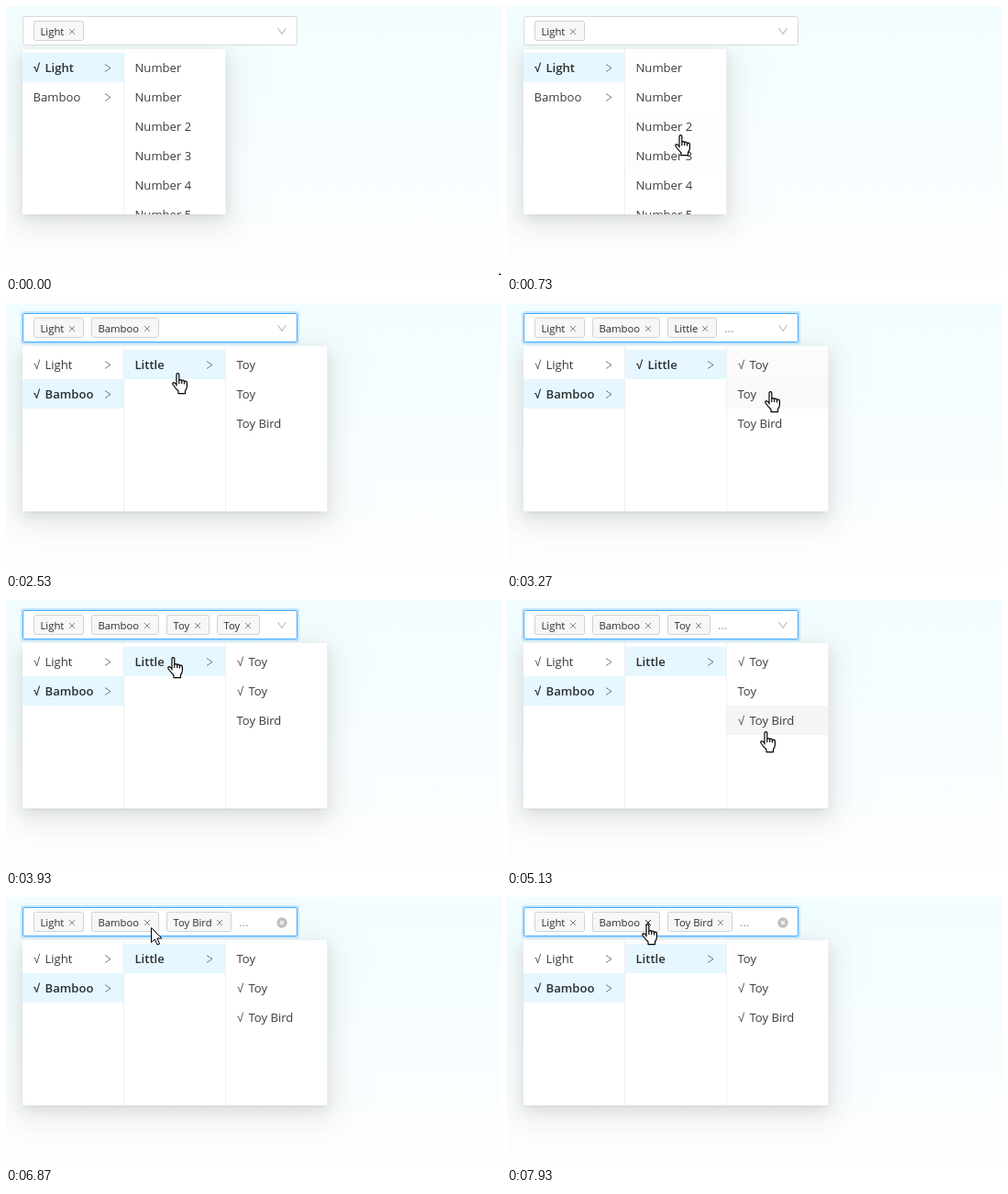
Recreate the animation shown at these times as an HTML page with a canvas. Size 540 by 293 pixels, loop 8000 ms.

```html
<!DOCTYPE html>
<html lang="en">
<head>
<meta charset="utf-8">
<title>Cascading multi-select</title>
<style>
  html, body { margin: 0; width: 100%; height: 100%; overflow: hidden; background: #fff; }
  canvas { display: block; width: 540px; height: 293px; }
</style>
</head>
<body>
<canvas id="stage" width="540" height="293"></canvas>
<script>
const ctx = document.getElementById('stage').getContext('2d');
const LOOP = 8000, FPS = 15;
const FONT = '"Open Sans", "Noto Sans", sans-serif';
const TOP = 47, ROW_TOP = 51, ROW = 32, COL = 111, LEFT = 18, BOTTOM = 227;

// Pointer hotspot: [tick, x, y]
const PATH = [
  [0, 538, 291], [13, 125, 113], [20, 125, 113], [21, 83, 113], [28, 83, 113],
  [29, 67, 98], [30, 67, 98], [35, 188, 75], [37, 188, 75], [38, 187, 76],
  [41, 187, 76], [42, 240, 74], [43, 287, 77], [46, 287, 77], [50, 287, 102],
  [52, 287, 102], [55, 178, 64], [56, 182, 62], [59, 182, 62], [63, 277, 112],
  [69, 277, 112], [72, 282, 143], [77, 282, 143], [82, 298, 98], [86, 296, 97],
  [87, 296, 97], [88, 250, 48], [89, 222, 41], [91, 214, 42], [94, 209, 29],
  [97, 209, 29], [100, 179, 36], [101, 177, 35], [103, 158, 33], [105, 172, 32],
  [113, 172, 32], [119, 153, 29]
];

// Picked options in order: id, tag label, tick picked, tick dropped
const PICKS = [
  ['light', 'Light', 0, 999], ['bamboo', 'Bamboo', 30, 999],
  ['little', 'Little', 41, 59], ['toy1', 'Toy', 46, 97], ['toy2', 'Toy', 51, 69],
  ['bird', 'Toy Bird', 77, 999], ['toy2', 'Toy', 84, 999]
];
const TAG_WIDTH = { Light: 55, Bamboo: 74, Little: 54, Toy: 47, 'Toy Bird': 71 };
const NUMBERS = ['Number', 'Number', 'Number 2', 'Number 3', 'Number 4', 'Number 5']
  .map((label, i) => ({ id: 'n' + i, label }));

const HAND = new Path2D('M5 14V2Q5 .6 6.4 .6Q7.8 .6 7.8 2V8Q9.4 6.9 10.7 8.5Q12.3 7.6 13.5 9.3' +
  'Q16.3 8.6 16.4 11V15Q16.2 17.5 14.5 19.6V22.6H7V20Q4 17 1.1 13Q.2 11 1.8 10.7Q3.4 10.8 5 13Z');
const HAND_LINES = new Path2D('M7.8 8V12M10.7 8.5V12M13.5 9.3V12.5');
const ARROW = new Path2D('M.5 .5V16.5L4.3 13L7 19L9.6 18L6.9 12H12Z');

const black = a => `rgba(0,0,0,${a})`;

function pointer(n) {
  const i = PATH.findIndex(k => k[0] >= n);
  if (i < 1) return { x: PATH[0][1], y: PATH[0][2] };
  const [a, ax, ay] = PATH[i - 1], [b, bx, by] = PATH[i];
  const f = (n - a) / (b - a);
  return { x: Math.round(ax + (bx - ax) * f), y: Math.round(ay + (by - ay) * f) };
}

function columns(n) {
  const onBamboo = n >= 13, onLittle = n >= 34;
  const cols = [[
    { id: 'light', label: 'Light', sub: true, active: !onBamboo },
    { id: 'bamboo', label: 'Bamboo', sub: true, active: onBamboo }
  ]];
  cols.push(onBamboo ? [{ id: 'little', label: 'Little', sub: true, active: onLittle }] : NUMBERS);
  if (onLittle) cols.push([
    { id: 'toy1', label: 'Toy' }, { id: 'toy2', label: 'Toy' }, { id: 'bird', label: 'Toy Bird' }
  ]);
  return cols;
}

function hovered(n) {
  const { x, y } = pointer(n);
  if (y < ROW_TOP || y >= BOTTOM || x < LEFT) return null;
  const col = columns(n)[Math.floor((x - LEFT) / COL)];
  const item = col && col[Math.floor((y - ROW_TOP) / ROW)];
  return item ? item.id : null;
}

function overSelect(n) {
  const { x, y } = pointer(n);
  return x >= 18 && x < 318 && y >= 11 && y < 43;
}

// Share of the last 0.3 s for which a test held: a linear fade
function fade(n, test) {
  let sum = 0;
  for (let k = 0; k < 5; k++) if (n >= k && test(n - k)) sum++;
  return sum / 5;
}

function text(str, x, y, size, color, weight = 400) {
  ctx.font = `${weight} ${size}px ${FONT}`;
  ctx.fillStyle = color;
  ctx.fillText(str, x, y);
}

function line(color, width, ...pts) {
  ctx.beginPath();
  pts.forEach(([x, y]) => ctx.lineTo(x, y));
  ctx.strokeStyle = color;
  ctx.lineWidth = width;
  ctx.stroke();
}

function cross(x, y, r, color, width) {
  line(color, width, [x - r, y - r], [x + r, y + r]);
  line(color, width, [x - r, y + r], [x + r, y - r]);
}

function box(x, y, w, h, r, fill, stroke) {
  ctx.beginPath();
  ctx.roundRect(x, y, w, h, r);
  if (fill) { ctx.fillStyle = fill; ctx.fill(); }
  if (stroke) { ctx.strokeStyle = stroke; ctx.lineWidth = 1; ctx.stroke(); }
}

// Only the shadow lands on the stage; its caster lies far to the left
function shadow(x, y, w, h, dy, blur, spread, alpha) {
  ctx.save();
  ctx.shadowColor = black(alpha);
  ctx.shadowBlur = blur;
  ctx.shadowOffsetX = 2000;
  ctx.shadowOffsetY = dy;
  ctx.fillStyle = '#000';
  ctx.fillRect(x - spread - 2000, y - spread, w + 2 * spread, h + 2 * spread);
  ctx.restore();
}

function drawBackground() {
  const g = ctx.createLinearGradient(0, 0, 0, 293);
  g.addColorStop(0, '#f2fdff');
  g.addColorStop(1, '#fefeff');
  ctx.fillStyle = g;
  ctx.fillRect(0, 0, 540, 293);
}

function drawMenu(n, picked) {
  const cols = columns(n), w = COL * cols.length, h = BOTTOM - TOP;
  shadow(LEFT, TOP, w, h, 3, 6, -4, 0.12);
  shadow(LEFT, TOP, w, h, 6, 16, 0, 0.08);
  shadow(LEFT, TOP, w, h, 9, 28, 8, 0.05);
  ctx.save();
  ctx.beginPath();
  ctx.rect(LEFT, TOP, w, h);
  ctx.clip();
  ctx.fillStyle = '#fff';
  ctx.fillRect(LEFT, TOP, w, h);
  cols.forEach((items, c) => {
    const x = LEFT + c * COL;
    items.forEach((item, r) => drawItem(n, item, x, ROW_TOP + r * ROW, picked.has(item.id)));
    ctx.fillStyle = '#f0f0f0';
    ctx.fillRect(x + COL - 1, TOP, 1, h);
  });
  ctx.restore();
}

function drawItem(n, item, x, y, checked) {
  const glow = item.active ? 0 : fade(n, k => hovered(k) === item.id);
  ctx.fillStyle = item.active ? '#e6f7ff' : black(0.04 * glow);
  ctx.fillRect(x, y, COL - 1, ROW);
  const weight = item.active ? 600 : 400;
  const color = item.active ? '#2b2f31' : '#3c3c3c';
  if (checked) {
    ctx.font = `${item.active ? 700 : 400} 13px "Liberation Sans", sans-serif`;
    ctx.fillStyle = color;
    ctx.fillText('√', x + 12, y + 21);
  }
  text(item.label, x + (checked ? 24.5 : 11.5), y + 21, 13.1, color, weight);
  if (item.sub) line(black(0.5), 1, [x + 90, y + 12.5], [x + 96, y + 16.5], [x + 90, y + 20.5]);
}

function drawTags(picks, mouse) {
  let x = 30, overX = false;
  for (const [, label] of picks) {
    const w = TAG_WIDTH[label];
    if (x + w > 280) {
      text('...', x, 32, 13, black(0.42));
      break;
    }
    box(x + 0.5, 16.5, w - 1, 21, 2, '#f7f7f7', '#d2d2d2');
    text(label, x + 7.5, 32, 11.3, '#2e2e2e');
    const cx = x + w - 13;
    const hot = Math.abs(mouse.x - cx) < 5 && Math.abs(mouse.y - 28) < 5;
    cross(cx, 28, 3, black(hot ? 0.8 : 0.45), 1);
    overX = overX || hot;
    x += w + 8;
  }
  return overX;
}

function drawSelect(n, picks, mouse) {
  const focus = n >= 30;
  if (focus) box(16, 9, 304, 36, 3, 'rgba(24,144,255,.2)');
  box(18.5, 11.5, 299, 31, 2, '#fff', focus ? '#40a9ff' : '#d9d9d9');
  const overX = drawTags(picks, mouse);
  line(black(0.27), 1.1, [296.5, 24], [301, 30.5], [305.5, 24]);

  ctx.save();
  ctx.globalAlpha = fade(n, overSelect);
  ctx.fillStyle = '#fff';
  ctx.fillRect(295, 21, 12, 13);
  ctx.beginPath();
  ctx.arc(301, 28, 5.7, 0, 7);
  ctx.fillStyle = '#bfbfbf';
  ctx.fill();
  cross(301, 28, 2, '#fff', 1.1);
  ctx.restore();
  return overX;
}

function drawPointer({ x, y }, hand) {
  ctx.save();
  ctx.translate(hand ? x - 6 : x, y);
  ctx.lineJoin = 'round';
  ctx.lineWidth = hand ? 1.2 : 1;
  ctx.fillStyle = '#fff';
  ctx.strokeStyle = '#000';
  const shape = hand ? HAND : ARROW;
  ctx.fill(shape);
  ctx.stroke(shape);
  if (hand) ctx.stroke(HAND_LINES);
  ctx.restore();
}

function draw(ms) {
  const n = Math.min(119, Math.floor((ms % LOOP + 5) * FPS / 1000));
  const picks = PICKS.filter(p => n >= p[2] && n < p[3]);
  const mouse = pointer(n);
  drawBackground();
  drawMenu(n, new Set(picks.map(p => p[0])));
  const overX = drawSelect(n, picks, mouse);
  drawPointer(mouse, overX || hovered(n) !== null);
}

let start;
function tick(now) {
  if (start === undefined) start = now;
  draw(now - start);
  requestAnimationFrame(tick);
}
draw(0);
requestAnimationFrame(tick);
</script>
</body>
</html>
```
